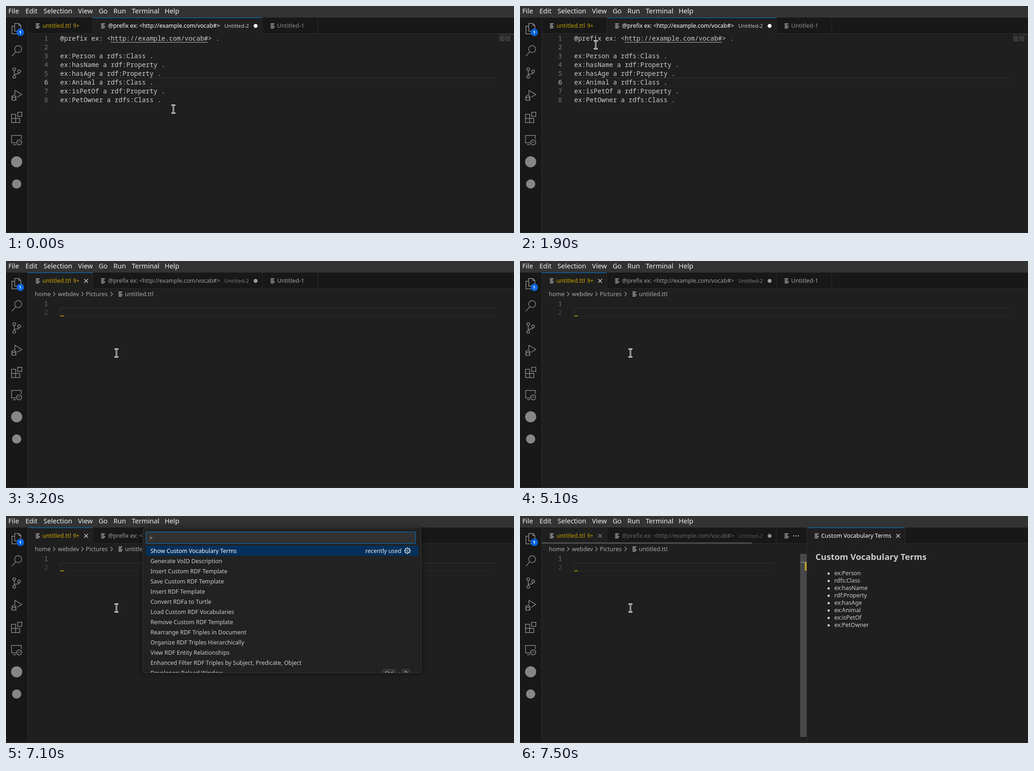
Recreate the animation shown at these times as an HTML page. Size 1097 by 491 pixels, loop 8000 ms.

```html
<!DOCTYPE html>
<html lang="en">
<head>
<meta charset="utf-8">
<title>Vocabulary terms</title>
<style>
html, body { margin: 0; width: 100%; height: 100%; overflow: hidden; background: #1f1f1f; }
#stage { position: relative; width: 1097px; height: 491px; overflow: hidden; background: #1f1f1f;
  font: 12.4px "Noto Sans", "Open Sans", sans-serif; color: #ccc;
  --own: #c0a000; --second: #fff; --dot: #fff; --third: #8c8c8c; --icon: #c5c5c5; --close: #e0e0e0; }
#stage[data-view=turtle] { --own: #cca700; --second: #9d9d9d; --dot: #9d9d9d; --third: #a3a3a3; }
#stage[data-view=split] { --own: #bfa000; --second: #666; --dot: #8c8c8c; --close: #8a8a8a; }
#stage div, #stage svg { position: absolute; }
.t { white-space: pre; line-height: 20px; }
.layer { left: 0; top: 0; width: 1097px; height: 491px; }
.mono { font-family: "Noto Sans Mono", "DejaVu Sans Mono", monospace; font-size: 14px; }
.off { display: none; }
svg { left: 0; top: 0; overflow: visible; fill: none; }
#palette { left: 295px; top: 25px; width: 600px; height: 313px; overflow: hidden; background: #222;
  border: 1px solid #373737; border-radius: 6px; box-shadow: 0 0 8px 2px rgba(0,0,0,.36); }
#minimap { transform: scale(.119, .105); transform-origin: 0 0; left: 1065px; top: 60px; width: 269px; height: 160px; overflow: hidden; }
</style>
</head>
<body>
<div id="stage" data-view="source"></div>
<script>
const stage = document.getElementById('stage');
const accent = '#0078d4';

function add(parent, cls, css, text = '') {
  const el = document.createElement('div');
  el.className = cls;
  el.style.cssText = css;
  el.textContent = text;
  parent.append(el);
  return el;
}
const layer = (parent = stage) => add(parent, 'layer', '');
const box = (parent, x, y, w, h, color, css = '') =>
  add(parent, '', `left:${x}px;top:${y}px;width:${w}px;height:${h}px;background:${color};${css}`);
const text = (parent, x, mid, str, css = '', cls = '') =>
  add(parent, 't ' + cls, `left:${x}px;top:${mid - 10}px;${css}`, str);
function draw(parent, markup) {
  const svg = document.createElementNS('http://www.w3.org/2000/svg', 'svg');
  svg.setAttribute('width', 1097);
  svg.setAttribute('height', 491);
  svg.innerHTML = markup;
  parent.append(svg);
  return svg;
}
const show = (el, on) => el.classList.toggle('off', !on);

const fileIcon = (x, y) =>
  `<path d="M${x} ${y - 4.5}h8M${x} ${y - 1.5}h6M${x} ${y + 1.5}h9M${x} ${y + 4.5}h7" stroke="var(--icon)" stroke-width="1.3"/>`;
const cross = (x, y, color) =>
  `<path d="M${x - 4} ${y - 4}l8 8m0 -8l-8 8" stroke="${color}" stroke-width="1.2"/>`;
const gear = (x, y, r, color) => {
  const spokes = Array.from({ length: 8 }, (_, i) => {
    const a = i * Math.PI / 4, c = Math.cos(a), s = Math.sin(a);
    return `M${x + c * r * .7} ${y + s * r * .7}L${x + c * r} ${y + s * r}`;
  }).join('');
  return `<g stroke="${color}"><circle cx="${x}" cy="${y}" r="${r * .72}" stroke-width="1.3"/>
    <circle cx="${x}" cy="${y}" r="${r * .27}"/><path d="${spokes}" stroke-width="2.4"/></g>`;
};

// Menu bar
box(stage, 0, 0, 1097, 25, '#333');
Object.entries({ File: 5, Edit: 42, Selection: 81, View: 155.5, Go: 200, Run: 232, Terminal: 271.5, Help: 342.5 })
  .forEach(([name, x]) => text(stage, x, 10, name, 'font-size:14.6px;color:#eee'));

// Activity bar: 24 px icons, 48 px apart
box(stage, 0, 25, 46, 466, '#181818');
const activityIcons = [
  '<path d="M7.750 .75h9l4.500 4.500v12h-13.500zM16.750 .75v4.500h4.500M7.750 6.750h-6v16.500h13.500v-6"/>',
  '<circle cx="15.250" cy="8.250" r="7.500"/><path d="M10.200 14L1.600 23.500"/>',
  '<circle cx="6.800" cy="3.700" r="3"/><circle cx="6.800" cy="20.200" r="3"/><circle cx="17.300" cy="8.200" r="3"/>' +
    '<path d="M6.800 6.700v10.500M17.300 11.200c-.6 2-2 3-3.800 3h-3c-2 0-3.500 1-3.800 3"/>',
  '<path d="M8.250 11V1.300l14.700 8.900l-9.450 6.300M2.250 19.500v-3.400a3.750 3.750 0 0 1 7.500 0v3.400a3.750 3.750 0 0 1-7.500 0zm0-3h7.500' +
    'M.5 14l2 2M11.500 14l-2 2M0 18.750h2M10 18.750h2M.5 23.500l2-2M11.500 23.500l-2-2"/>',
  '<path d="M14.250 .75h9v9h-9zM.75 5.250h9v9h9v9h-18zM.75 14.250h9v9"/>',
  '<path d="M11 19h-10v-16h21v8M4 23h7"/><circle cx="17.500" cy="18" r="5.500"/><path d="M15 16l2 2l-2 2M20 15l-2 2l2 2" stroke-width="1"/>',
];
draw(stage, activityIcons.map((icon, i) =>
  `<g transform="translate(11 ${37 + 48 * i})" stroke="#868686" stroke-width="1.5">${icon}</g>`).join('') +
  `<circle cx="23" cy="337" r="12" fill="#868686"/><circle cx="23" cy="385" r="10" fill="#868686"/>
  <circle cx="31" cy="57" r="8" fill="#0a64dc"/>`);
text(stage, 28, 57, '1', 'font-size:9.5px;color:#fff;font-weight:600');

// Tab strip
const strip = layer();
const activeTab = (parent, x, w) => {
  const tab = box(parent, x, 25, w, 35, '#1f1f1f');
  return { tab, edge: box(tab, 0, 0, w, 1, accent) };
};
box(strip, 47, 25, 1050, 34, '#181818');
box(strip, 47, 59, 1050, 1, '#2b2b2b');
const hoverTab = box(strip, 47, 25, 140, 34, '#1f1f1f');
const ownTab = activeTab(strip, 47, 140);
const prefixTab = activeTab(strip, 188, 365);
[187, 553, 673].forEach(x => box(strip, x, 25, 1, 35, '#2b2b2b'));
draw(strip, fileIcon(64.5, 43) + fileIcon(205.5, 43) + fileIcon(571.5, 43) +
  '<circle cx="539" cy="43" r="4.3" fill="var(--dot)"/>');
text(strip, 78.7, 42.5, 'untitled.ttl', 'color:var(--own);font-size:12.6px');
text(strip, 145, 42, '9+', 'color:var(--own);font-size:11.7px');
text(strip, 220.5, 42.5, '@prefix ex: <http://example.com/vocab#>', 'color:var(--second);font-size:12.3px');
text(strip, 471.5, 42.5, 'Untitled-2', 'color:var(--second);opacity:.75;font-size:11.4px');
text(strip, 585.5, 42.5, 'Untitled-1', 'color:var(--third);font-size:12.6px');
const closeOwn = draw(strip, cross(173, 43, 'var(--close)'));

// Editor with the vocabulary source
const lines = ['@prefix ex: <http://example.com/vocab#> .', '', 'ex:Person a rdfs:Class .',
  'ex:hasName a rdf:Property .', 'ex:hasAge a rdf:Property .', 'ex:Animal a rdfs:Class .',
  'ex:isPetOf a rdf:Property .', 'ex:PetOwner a rdfs:Class .'];
const lineNumber = (parent, mid, n, color) =>
  text(parent, 61, mid, n, `width:30px;text-align:right;color:${color}`, 'mono');
const currentLine = (parent, y, w) => {
  box(parent, 117, y, w, 1.5, '#2a2a2a');
  box(parent, 117, y + 17.5, w, 1.5, '#2a2a2a');
};
const source = layer();
currentLine(source, 155, 940);
const minimap = add(source, '', '');
minimap.id = 'minimap';
lines.forEach((line, i) => {
  const mid = 69.5 + 19 * i;
  lineNumber(source, mid, i + 1, i === 5 ? '#ccc' : '#6e7681');
  text(source, 117, mid, line, '', 'mono');
  text(minimap, 0, 9.5 + 19 * i, line, '', 'mono');
});
box(source, 226, 78, 210, 1, '#bbb');

// Editor with the turtle file
const turtle = layer();
Object.entries({ home: 62.3, webdev: 112, Pictures: 172.3, 'untitled.ttl': 256.7 })
  .forEach(([name, x]) => text(turtle, x, 71.5, name, 'color:#a9a9a9;font-size:12.6px'));
draw(turtle, [102, 163, 226].map(x => `<path d="M${x} 67l4 4.500l-4 4.500" stroke="#a0a0a0" stroke-width="1.2"/>`).join('') + fileIcon(243, 71.5));
lineNumber(turtle, 91.5, 1, '#6e7681');
lineNumber(turtle, 110.5, 2, '#484848');
const wideLine = layer(turtle), narrowLine = layer(turtle);
currentLine(wideLine, 101, 940);
currentLine(narrowLine, 101, 430);
box(turtle, 117, 102, 1, 17, '#343434');
const squiggle = draw(turtle, '<path d="M117 119.500l1.500-1l1.500 1l2-2l2 2l1 -.5" stroke="#cca700" stroke-width="1.2"/>');
const editorCaret = box(turtle, 117, 101, 2, 19, '#aeafad');

// Split view with the result panel
const split = layer();
box(split, 47, 57, 454, 3, '#4d4d4d');
box(split, 584, 25, 35, 34, '#181818');
draw(split, '<g fill="#ccc"><circle cx="591" cy="43" r="1.2"/><circle cx="596" cy="43" r="1.2"/><circle cx="601" cy="43" r="1.2"/></g>');
box(split, 605, 82, 14, 396, '#484848');
box(split, 606, 99, 13, 2, '#777');
box(split, 615, 100, 4, 18, '#b89b2e');
box(split, 619, 25, 478, 466, '#1f1f1f');
box(split, 831, 25, 266, 34, '#181818');
box(split, 831, 59, 266, 1, '#2b2b2b');
box(split, 831, 25, 1, 35, '#2b2b2b');
activeTab(split, 620, 211);
box(split, 619, 25, 1, 466, '#2f2f2f');
draw(split, fileIcon(636.5, 43) + cross(816.5, 43, '#e0e0e0'));
text(split, 650.5, 42.5, 'Custom Vocabulary Terms', 'color:#fff');
const result = layer(split);
text(result, 638, 88, 'Custom Vocabulary Terms', 'font-size:18.5px;font-weight:700');
['ex:Person', 'rdfs:Class', 'ex:hasName', 'rdf:Property', 'ex:hasAge', 'ex:Animal', 'ex:isPetOf', 'ex:PetOwner']
  .forEach((term, i) => {
    text(result, 678.7, 123.5 + 16 * i, term);
    box(result, 664, 122 + 16 * i, 5, 5, '#ccc', 'border-radius:50%');
  });

box(stage, 46, 25, 1, 466, '#2b2b2b');
box(stage, 0, 490, 1097, 1, '#2b2b2b');

// Command palette, laid out in stage coordinates
const palette = add(stage, '', '');
palette.id = 'palette';
const sheet = add(palette, '', 'left:-296px;top:-26px;width:1097px;height:491px');
box(sheet, 302, 34, 581, 24, '#313131', `border:1px solid ${accent};border-radius:2px`);
text(sheet, 309.7, 47.5, '>');
const inputCaret = box(sheet, 316, 39, 1, 16, '#ddd');
box(sheet, 302, 64, 589, 22, '#04305c', 'border-radius:3px');
['Show Custom Vocabulary Terms', 'Generate VoID Description', 'Insert Custom RDF Template',
  'Save Custom RDF Template', 'Insert RDF Template', 'Convert RDFa to Turtle', 'Load Custom RDF Vocabularies',
  'Remove Custom RDF Template', 'Rearrange RDF Triples in Document', 'Organize RDF Triples Hierarchically',
  'View RDF Entity Relationships', 'Enhanced Filter RDF Triples by Subject, Predicate, Object',
  'Developer: Reload Window'].forEach((label, i) =>
    text(sheet, 312, 75.5 + 22 * i, label, i ? '' : 'color:#fff'));
text(sheet, 776, 75.5, 'recently used', 'color:#e8e8e8');
draw(sheet, gear(867, 75, 7, '#e0e0e0'));
box(sheet, 812, 331, 31, 18, '#363636', 'border-radius:3px');
box(sheet, 854, 331, 19, 18, '#363636', 'border-radius:3px');
[['Ctrl', 818], ['+', 846], ['R', 860]].forEach(([key, x]) => text(sheet, x, 339.5, key, 'font-size:11px'));
const slider = box(sheet, 882, 64, 10, 20, 'rgba(121,121,121,.4)');

// Mouse pointers, drawn around their hot spot
const beam = draw(stage, `<g stroke-linecap="square" transform="translate(-.5 0)"><path d="M-2.500 -8.500h1.500l1 1l1 -1h1.500M0 -7v14M-2.500 8.500h1.500l1 -1l1 1h1.500" stroke="#fff" stroke-width="3"/>
  <path d="M-2 -8.500h1l1 1l1 -1h1M0 -7v14M-2 8.500h1l1 -1l1 1h1" stroke="#000" stroke-width="1"/></g>`);
const hand = draw(stage, `<path d="M-2 13V2.500a2 2 0 0 1 4 0V8.500q3-1 4 1q3-.5 3.500 1.500q2.500 0 2.500 2.500V17q0 5-4 5H1.500q-2 0-3.500-3l-4.500-6q0-3 4.500 0z"
  fill="#000" stroke="#fff" stroke-width="1.2" stroke-linejoin="round"/>`);

const path = [[0, 362, 223], [700, 352, 213], [800, 340, 202], [900, 334, 197],
  [1600, 318, 190], [1700, 272, 160], [1800, 210, 115], [1900, 164, 84], [2000, 142, 62],
  [2100, 130, 39], [2200, 128, 45], [2800, 120, 52], [2900, 122, 70], [3000, 150, 115],
  [3100, 214, 180], [3200, 239, 199]];
const within = (t, ...spans) => spans.some(([from, to]) => t >= from && t < to);

function render(t) {
  const view = t < 2500 ? 'source' : t < 7400 ? 'turtle' : 'split';
  stage.dataset.view = view;
  const isSource = view === 'source', isSplit = view === 'split';
  const hovered = within(t, [2100, 2500]);
  show(source, isSource);
  show(turtle, !isSource);
  show(split, isSplit);
  show(result, t >= 7500);
  show(wideLine, !isSplit);
  show(narrowLine, isSplit);
  show(prefixTab.tab, isSource);
  show(ownTab.tab, !isSource);
  show(ownTab.edge, !isSplit);
  show(hoverTab, hovered);
  show(closeOwn, !isSource || hovered);
  show(squiggle, t >= 2600);
  show(editorCaret, within(t, [2600, 3100], [3600, 4100], [4600, 5100]));
  show(palette, within(t, [5300, 7300]));
  show(inputCaret, within(t, [5300, 6000], [6500, 7100]));
  slider.style.opacity = t < 5400 ? .1 : Math.max(0, Math.min(1, 1 - (t - 5700) / 800));

  const [, x, y] = path.findLast(([at]) => at <= t);
  const pointing = within(t, [2100, 3000]);
  show(hand, pointing);
  show(beam, !pointing);
  (pointing ? hand : beam).style.transform = `translate(${x}px, ${y}px)`;
}

const start = performance.now();
function tick() {
  const t = (performance.now() - start) % 8000;
  render(Math.floor(t / 100) * 100);
  requestAnimationFrame(tick);
}
tick();
</script>
</body>
</html>
```
